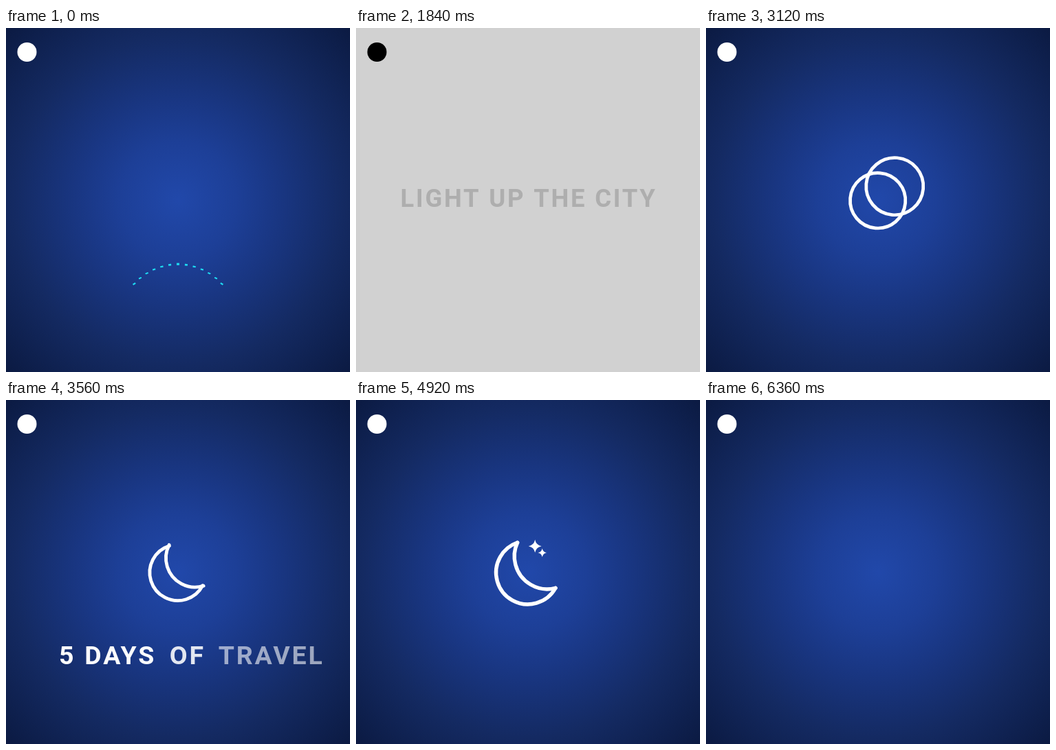
An HTML page with a canvas that plays this animation: 500 px wide and 500 px high, repeating every 7.2 s.

```html
<!DOCTYPE html>
<html lang="en">
<head>
<meta charset="utf-8">
<title>Light up the city</title>
<style>
  html, body { margin: 0; width: 100%; height: 100%; overflow: hidden; background: #0b1a42; }
  canvas { display: block; width: 100vmin; height: 100vmin; }
</style>
</head>
<body>
<canvas id="stage" width="500" height="500"></canvas>
<script>
const ctx = document.getElementById('stage').getContext('2d');
const LOOP = 7200, TAU = Math.PI * 2, DEG = Math.PI / 180;
const CITY_IN = 1800, CITY_OUT = 2760;

const lerp = (a, b, p) => a + (b - a) * p;
const progress = (t, from, to) => Math.min(1, Math.max(0, (t - from) / (to - from)));
const easeOut = p => 1 - (1 - p) ** 3;
const easeInOut = p => p * p * (3 - 2 * p);

const night = ctx.createRadialGradient(250, 250, 0, 250, 250, 354);
[[0, '#2148aa'], [0.24, '#1d3f97'], [0.42, '#193682'], [0.68, '#142a62'], [1, '#0b1a42']]
  .forEach(([at, colour]) => night.addColorStop(at, colour));

function fillStage(colour) {
  ctx.fillStyle = colour;
  ctx.fillRect(0, 0, 500, 500);
}

function drawBadge(colour) {
  ctx.fillStyle = colour;
  ctx.beginPath();
  ctx.arc(30.5, 35, 14, 0, TAU);
  ctx.fill();
}

function setType(size, spacing, colour) {
  ctx.font = `700 ${size}px Roboto, sans-serif`;
  ctx.letterSpacing = spacing + 'px';
  ctx.fillStyle = colour;
}

// Fan of light bars; lengths run from the middle bar outwards.
const barLengths = [195, 125.5, 75, 53.5, 41, 35, 30.5];

function drawBars(t) {
  const p = t / 1360, grow = p ** 3, rise = Math.min(1, grow);
  const dip = 7 * Math.sin(Math.PI * Math.min(1, p));
  const radius = lerp(85, 81, rise), centreY = lerp(429.5, 417.3, rise) + dip;
  const step = lerp(8, 7.55, rise) * DEG;
  ctx.save();
  ctx.strokeStyle = `rgb(${lerp(31, 54, rise)}, ${lerp(218, 246, rise)}, 240)`;
  ctx.lineWidth = 4;
  ctx.shadowColor = '#19b8e8';
  ctx.shadowBlur = 5 * rise;
  for (let i = -6; i <= 6; i++) {
    const x = 250 + radius * Math.sin(step * i);
    const y = centreY - radius * Math.cos(step * i);
    const length = barLengths[Math.abs(i)] * (grow + 0.006) + 1.6 * (1 - rise);
    const tilt = 5.05 * DEG * i;
    ctx.beginPath();
    ctx.moveTo(x, y);
    ctx.lineTo(x + length * Math.sin(tilt), y - length * Math.cos(tilt));
    ctx.stroke();
  }
  ctx.restore();
}

function drawCityLine(t) {
  ctx.save();
  ctx.globalAlpha = progress(t, CITY_IN, CITY_IN + 240);
  setType(36.5, 2.75, '#050505');
  ctx.fillText('LIGHT UP THE CITY', 64.5, 260);
  ctx.restore();
}

function drawSparkle(x, y, size) {
  ctx.beginPath();
  ctx.moveTo(x, y - size);
  for (const [dx, dy] of [[1, 0], [0, 1], [-1, 0], [0, -1]]) {
    const bend = size * 0.16;
    const sx = dx || dy, sy = dy || -dx;
    ctx.quadraticCurveTo(x + bend * sx, y + bend * sy, x + size * dx, y + size * dy);
  }
  ctx.fill();
}

// Two rings slide apart, then lose the arcs outside the crescent.
function drawMoon(t) {
  const zoom = progress(t, 5240, 5640);
  const scale = easeOut(progress(t, CITY_OUT, 3240))
    * lerp(1, 1.13, easeInOut(progress(t, 4400, 4920))) * (1 + 9 * zoom ** 3);
  if (!scale || zoom === 1) return;
  const ringA = 40.8, ringB = 42.2, angle = -40 * DEG;
  const gap = lerp(4, 32.6, easeOut(progress(t, CITY_OUT, 3120)));
  const keep = 1 - easeInOut(progress(t, 3160, 3600));
  const halfAngle = (r, other) => Math.acos((gap ** 2 + r ** 2 - other ** 2) / (2 * gap * r));
  const cutA = halfAngle(ringA, ringB) * (1 - keep);
  const arcB = lerp(halfAngle(ringB, ringA), Math.PI, keep);

  ctx.save();
  ctx.globalAlpha = 1 - zoom;
  ctx.translate(249.7, 250.8);
  ctx.scale(scale, scale);
  ctx.strokeStyle = ctx.fillStyle = '#fff';
  ctx.lineWidth = 4.8;
  ctx.lineCap = 'round';
  ctx.beginPath();
  ctx.arc(0, 0, ringA, angle + cutA, angle - cutA + TAU);
  ctx.stroke();
  ctx.beginPath();
  ctx.arc(gap * Math.cos(angle), gap * Math.sin(angle), ringB,
    angle + Math.PI - arcB, angle + Math.PI + arcB);
  ctx.stroke();
  drawSparkle(9.3, -34, 8.3 * easeOut(progress(t, 3600, 3840)));
  drawSparkle(18.6, -25.5, 5.6 * easeOut(progress(t, 3720, 3960)));
  ctx.restore();
}

const travelWords = [['5', 77], ['DAYS', 114], ['OF', 234.8], ['TRAVEL', 298.8]];

function drawTravelLine(t) {
  const exit = progress(t, 4400, 4840);
  if (t < 3240 || exit === 1) return;
  const scale = lerp(1, 1.16, easeInOut(exit));
  ctx.save();
  ctx.translate(264.5, 371);
  ctx.scale(scale, scale);
  ctx.translate(-264.5, -371);
  setType(37.5, 2.8, '#fff');
  travelWords.forEach(([word, x], i) => {
    const enter = easeOut(progress(t, 3240 + i * 80, 3560 + i * 80));
    ctx.globalAlpha = enter * (1 - exit);
    ctx.fillText(word, x + 24 * (1 - enter), 384);
  });
  ctx.restore();
}

function draw(t) {
  const lit = t >= CITY_IN && t < CITY_OUT;
  fillStage(lit ? '#d1d1d1' : night);
  drawBadge(lit ? '#000' : '#fff');
  if (lit) {
    drawCityLine(t);
  } else if (t < CITY_IN) {
    drawBars(t);
  } else {
    drawMoon(t);
    drawTravelLine(t);
  }
}

const start = performance.now();
function tick() {
  draw((performance.now() - start) % LOOP);
  requestAnimationFrame(tick);
}
tick();
</script>
</body>
</html>
```
